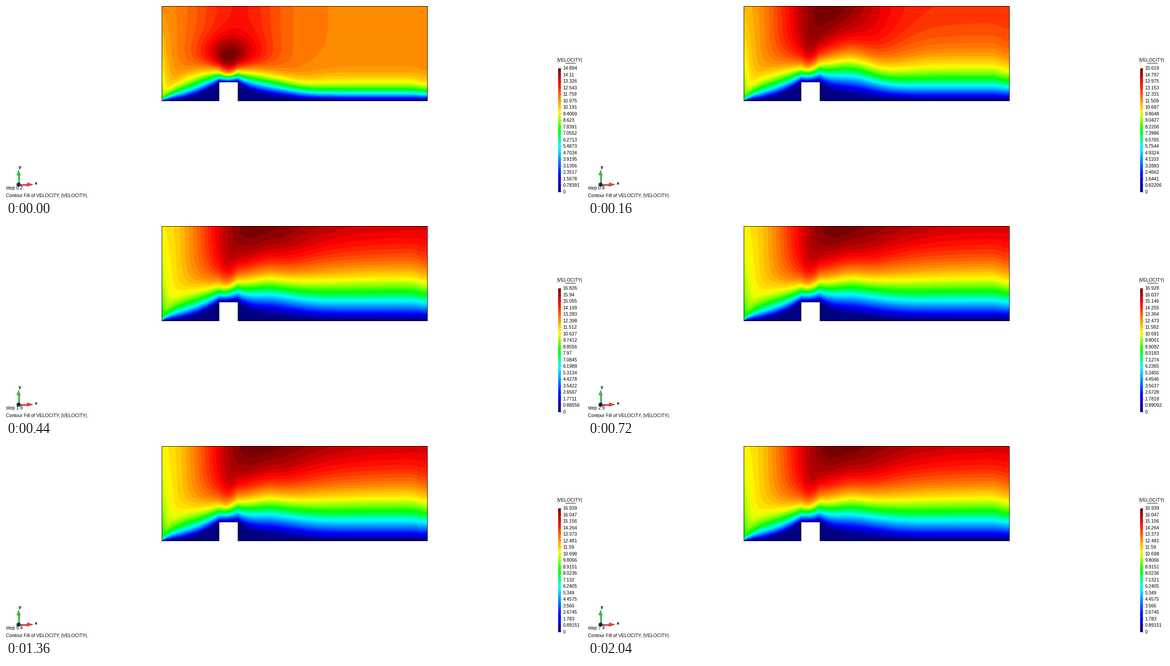
Animation of 1280 by 428 pixels, one loop 2.08 s. Source, as a matplotlib script:

```python
import numpy as np
import matplotlib.pyplot as plt
from matplotlib.animation import FuncAnimation
from matplotlib.colors import LinearSegmentedColormap
from matplotlib.patches import Circle, Polygon, Rectangle

W, H, DPI = 1280, 428, 100
FRAMES, INTERVAL = 52, 40
BANDS, TICKS = 50, 19
LEFT, RIGHT, FLOOR = 346, 936, 211
BLOCK_L, BLOCK_R, BLOCK_TOP = 473, 515, 169
UNIT = (RIGHT - LEFT) / 14
PT = 72 / DPI

plt.rcParams["font.family"] = "Liberation Sans"

ramp = LinearSegmentedColormap.from_list("ramp", [
    (0, (0, 0, 0.5)), (0.125, (0, 0, 1)), (0.36, (0, 1, 1)), (0.5, (0, 1, 0)),
    (0.645, (1, 1, 0)), (0.89, (1, 0, 0)), (1, (0.47, 0, 0))])
COLORS = (ramp(np.linspace(0, 1, BANDS))[:, :3] * 255).round().astype(np.uint8)

# Simulation time and peak speed along the loop
KEYS = [0, 4, 11, 18, 26, 42, 51]
TIMES = [0.2, 0.8, 1.9, 2.9, 4.3, 6.5, 7.4]
PEAKS = np.array([14.89422, 15.6192, 16.82564, 16.92752,
                  16.93827, 16.938625, 16.938625])
LIMIT = 16.938626
GAPS = LIMIT - PEAKS

# x in block widths from the inlet (block from 3 to 4), height in pixels
xs = (np.arange(LEFT, RIGHT + 1) - LEFT) / UNIT
rise = FLOOR - np.arange(FLOOR + 1.0)[:, None]


def step(x, a, b):
    t = np.clip((x - a) / (b - a), 0, 1)
    return t * t * (3 - 2 * t)


def bell(x, centre, width):
    return np.exp(-((x - centre) / width) ** 2)


def flow(inlet, far, boost, tail, near_h, far_h, hump, dip):
    """Speed over the domain: outer stream times boundary layer.

    inlet, far, boost, tail shape the speed along the top;
    near_h, far_h, hump, dip shape the layer thickness.
    """
    top = (inlet + (far - inlet) * step(xs, 0, 5)
           + boost * bell(xs, 4, np.where(xs < 4, 2.9, tail)))
    dead = 40 * np.where(xs < 3, (xs / 3) ** 2.5,
                         np.exp(-np.maximum(xs - 4, 0)))
    thick = (near_h * (1 - np.exp(-xs)) + (far_h - near_h) * step(xs, 3, 6)
             + hump * bell(xs, 5.6, 1.5) - dip * bell(xs, 3.5, 0.8))
    thick = np.maximum(thick * (1 - 0.12 * step(xs, 13, 14)), 1)
    power = 1.15 + 0.4 * bell(xs, 6, 1.8)

    def layer(h):
        return 1 - 0.5 ** ((np.maximum(h - dead, 0) / thick) ** power)

    outer = (rise / FLOOR) ** (0.12 * np.exp(-xs / 0.4))
    return top * outer * layer(rise) / layer(FLOOR)


def jet_core():
    """Fast spot above the block at the start."""
    h = rise - 96
    return 0.15 * bell(xs, 3.5, 1.48) * bell(h, 0, np.where(h > 0, 46, 30))


early = flow(0.735, 0.765, 0.108, 2.3, 26, 18, 11, 15) + jet_core()
middle = flow(0.68, 0.835, 0.175, 3.3, 30, 41, 22, 12)
steady = flow(0.64, 0.915, 0.09, 4.5, 30, 66, 4, 8)
early, middle, steady = (f / f.max() for f in (early, middle, steady))


def state(frame):
    """Simulation time, peak speed and normalised field."""
    t = np.interp(frame, KEYS, TIMES)
    gap = np.exp(np.interp(t, TIMES, np.log(GAPS)))
    if t < TIMES[1]:
        p = (t - TIMES[0]) / (TIMES[1] - TIMES[0])
        field = early + (middle - early) * p
    else:
        field = steady + (middle - steady) * gap / GAPS[1]
    return t, LIMIT - gap, field / field.max()


def paint(field):
    return COLORS[np.clip((field * BANDS).astype(int), 0, BANDS - 1)]


fig = plt.figure(figsize=(W / DPI, H / DPI), dpi=DPI, facecolor="white")
ax = fig.add_axes([0, 0, 1, 1])


def label(x, y, s, size=10.4, **kw):
    return ax.text(x, y, s, fontsize=size * PT, va="baseline", **kw)


def line(px, py, **kw):
    """One-pixel line through pixel centres."""
    ax.plot(np.add(px, 0.5), np.add(py, 0.5), color="black", lw=PT,
            solid_joinstyle="miter", snap=False, **kw)


def bitmap(rgb, extent):
    return ax.imshow(rgb, extent=extent, interpolation="nearest",
                     aspect="auto", zorder=1)


def arrow(shaft, head, color, edge):
    for points in (shaft, head):
        ax.add_patch(Polygon(points, fc=color, ec=edge, lw=0.4, zorder=4))


# Flow domain
picture = bitmap(paint(early), (LEFT, RIGHT + 1, FLOOR + 1, 0))
ax.add_patch(Rectangle((BLOCK_L, BLOCK_TOP), BLOCK_R - BLOCK_L, 50,
                       fc="white", ec="none", zorder=2))
line([BLOCK_L, LEFT, LEFT, RIGHT, RIGHT, BLOCK_R, BLOCK_R, BLOCK_L, BLOCK_L],
     [FLOOR, FLOOR, 0, 0, FLOOR, FLOOR, BLOCK_TOP, BLOCK_TOP, FLOOR], zorder=3)

# Legend
bitmap(COLORS[::-1, None], (1227, 1233, 415, 139))
label(1224, 124, "|VELOCITY|")
line([1243, 1265], [127, 127])
values = []
for k in range(TICKS + 1):
    y = 414 - k * 276 / TICKS
    line([1233, 1234], [round(y), round(y)], alpha=0.5)
    values.append(label(1237.5, y + 4, "0"))

# Axis triad
arrow([(28, 396.5), (49, 396.5), (49, 399.5), (28, 399.5)],
      [(47, 393.8), (60, 398), (47, 402.2)], "#f04040", "#802020")
arrow([(26.5, 398), (26.5, 376), (29.5, 376), (29.5, 398)],
      [(23.8, 377), (28, 366), (32.2, 377)], "#2fd03a", "#1a6a20")
ax.add_patch(Circle((28, 398), 4.3, fc="#17506e", ec="#0b2a3c", lw=0.5, zorder=5))
bold = dict(family="DejaVu Sans", weight="bold", ha="center")
label(31, 362.5, "y", 9, **bold)
label(66.5, 398, "x", 9, **bold)
label(28.5, 401, "z", 8, zorder=6, **bold)

clock = label(-0.5, 409, "", zorder=7)
label(-0.5, 426, "Contour Fill of VELOCITY, |VELOCITY|.")

ax.set_xlim(0, W)
ax.set_ylim(H, 0)
ax.axis("off")


def update(frame):
    t, peak, field = state(frame)
    picture.set_data(paint(field))
    clock.set_text(f"step {t:.1f}")
    for k, text in enumerate(values):
        text.set_text(f"{peak * k / TICKS:.5g}")
    return [picture, clock, *values]


anim = FuncAnimation(fig, update, frames=FRAMES, interval=INTERVAL,
                     repeat=True, repeat_delay=0, blit=False)
plt.show()
```
